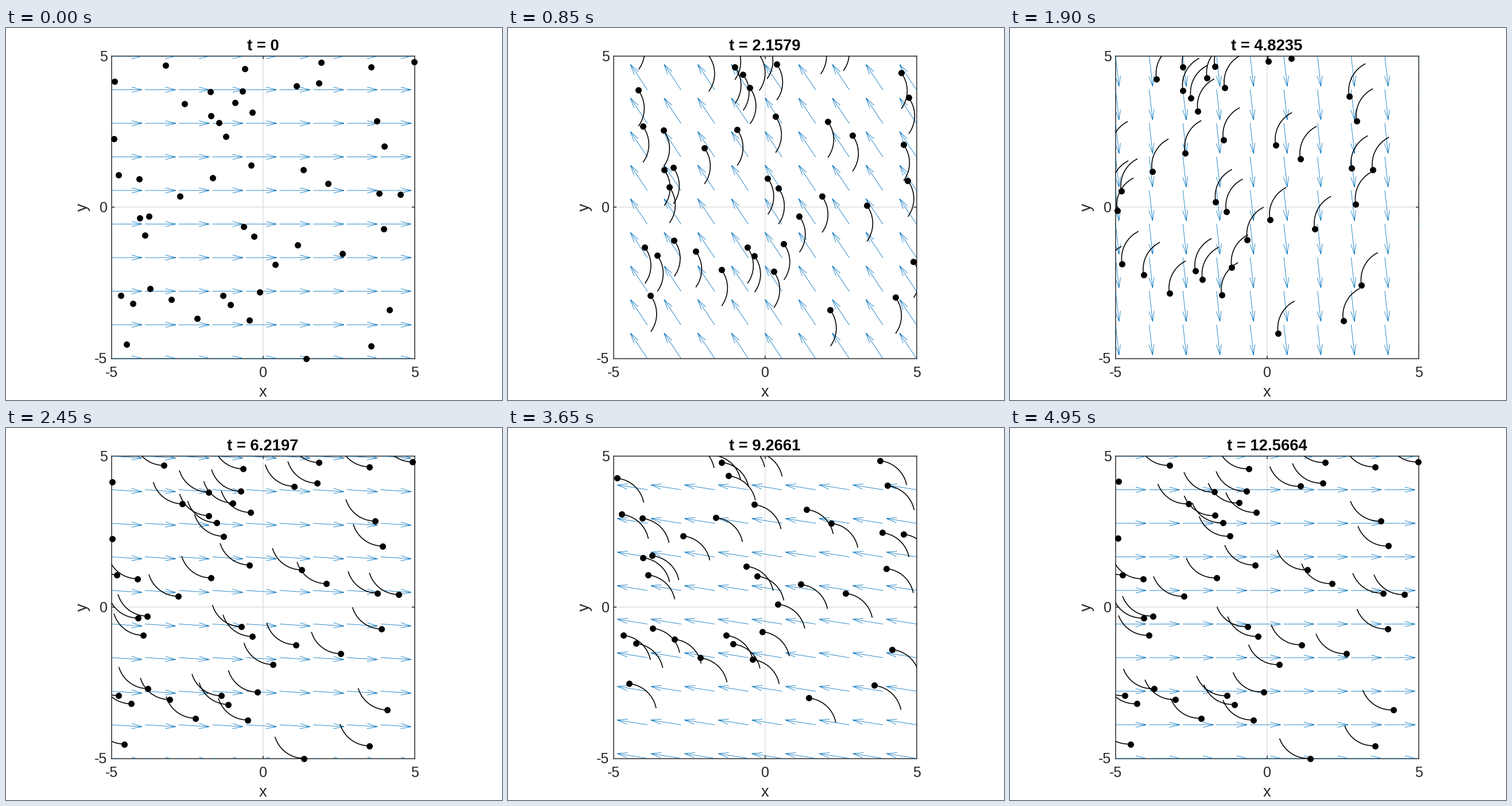
A matplotlib script for the animation above (5000 ms loop, 864 px wide and 648 px high).

```python
import math

import matplotlib.pyplot as plt
import numpy as np
from matplotlib.animation import FuncAnimation

W, H = 864, 648
LEFT, RIGHT, TOP, BOTTOM = 184, 711.5, 49, 575.5
STEPS, TRAIL = 100, 10
INK, BLUE, GRID = "#262626", "#0072BD", "#dfdfdf"

plt.rcParams["font.family"] = "Liberation Sans"

# Starting places of the particles, in stage pixels
START = np.array([
    188.5, 93.5, 278, 65, 416, 71, 548.5, 60, 636, 67.5, 711, 59,
    356, 111.5, 412, 110, 310.5, 132, 398.5, 130.5, 356.5, 152.5,
    370.5, 165, 429, 147, 382.5, 188.5, 505.5, 101.5, 545, 96,
    646, 162, 659, 205.5, 188, 192.5, 196, 255.5, 232, 262.5,
    360, 261, 427, 238.5, 518, 247, 561, 271, 303, 293,
    650, 287.5, 687, 290, 233, 331, 249, 327.5, 242, 361,
    413.5, 346, 432, 363, 508, 377.5, 468.5, 412, 586, 393,
    657.5, 350, 199.5, 466.3, 221, 480.3, 250.5, 454, 288, 473,
    333, 505.5, 378, 466.3, 390.5, 481.5, 441.5, 460, 424, 508.5,
    209.5, 550.5, 522.5, 575.5, 636, 553.5, 667.5, 491,
]).reshape(-1, 2)
START = np.column_stack([
    (START[:, 0] - LEFT) / (RIGHT - LEFT) * 10 - 5,
    5 - (START[:, 1] - TOP) / (BOTTOM - TOP) * 10,
])

# Uniform rotating flow, integrated step by step
times = np.linspace(0, 4 * math.pi, STEPS)
flow = np.column_stack([np.cos(times), np.sin(times)])
shift = np.cumsum(flow, axis=0) * times[1]
shift -= shift[0]

axis = np.linspace(-5, 5, 10)
nodes = np.stack(np.meshgrid(axis, axis), axis=-1).reshape(-1, 2)


def polylines(origins, shape):
    """Repeat one shape at every origin, split by gaps."""
    pts = origins[:, None, :] + shape[None, :, :]
    gap = np.full((len(origins), 1, 2), np.nan)
    pts = np.concatenate([pts, gap], axis=1).reshape(-1, 2)
    return pts[:, 0], pts[:, 1]


def arrow(direction):
    side = 0.084 * np.array([-direction[1], direction[0]])
    neck = 0.67 * direction
    gap = np.full(2, np.nan)
    return np.array([np.zeros(2), direction, gap,
                     neck + side, direction, neck - side])


def time_label(t):
    digits = 5
    if t >= 1:
        digits += math.floor(math.log10(t))
    return f"t = {t:.{digits}g}"


# At 72 dpi one point is one pixel
fig = plt.figure(figsize=(W / 72, H / 72), dpi=72, facecolor="white")
ax = fig.add_axes([LEFT / W, 1 - BOTTOM / H,
                   (RIGHT - LEFT) / W, (BOTTOM - TOP) / H])
ax.set(xlim=(-5, 5), ylim=(-5, 5), xticks=[0], yticks=[0])
ax.tick_params(direction="in", length=5.3, width=1.5, color=INK,
               top=True, right=True, labelbottom=False, labelleft=False)
ax.axhline(0, color=GRID, lw=1.5, zorder=0.5)
ax.axvline(0, color=GRID, lw=1.5, zorder=0.5)
for spine in ax.spines.values():
    spine.set(linewidth=1.5, color=INK)


def label(x, y, text, size=25, **style):
    style = {"color": INK, "ha": "center", "va": "baseline", **style}
    return fig.text(x / W, 1 - y / H, text, fontsize=size, **style)


for value in (-5, 0, 5):
    f = (value + 5) / 10
    label(LEFT + f * (RIGHT - LEFT), 608, str(value))
    label(176.5, BOTTOM - f * (BOTTOM - TOP) + 9, str(value), ha="right")
label(447.5, 641.5, "x", 27.4)
label(140.5, 312.5, "y", 27.4, rotation=90, rotation_mode="anchor")
title = label(447.5, 39, "", 27.4, color="black", weight="bold")

arrows, = ax.plot([], [], color=BLUE, lw=0.8, zorder=3)
trails, = ax.plot([], [], color="black", lw=1.6, zorder=4)
dots, = ax.plot([], [], "o", color="black", ms=11, mew=0,
                zorder=5, clip_on=False)


def draw(i):
    arrows.set_data(*polylines(nodes, arrow(flow[i])))
    trails.set_data(*polylines(START, shift[max(0, i - TRAIL):i + 1]))
    now = START + shift[i]
    seen = now[np.all(np.abs(now) <= 5.005, axis=1)]
    dots.set_data(seen[:, 0], seen[:, 1])
    title.set_text(time_label(times[i]))
    return arrows, trails, dots, title


anim = FuncAnimation(fig, draw, frames=STEPS, interval=50,
                     repeat=True, repeat_delay=0, blit=False)
plt.show()
```
